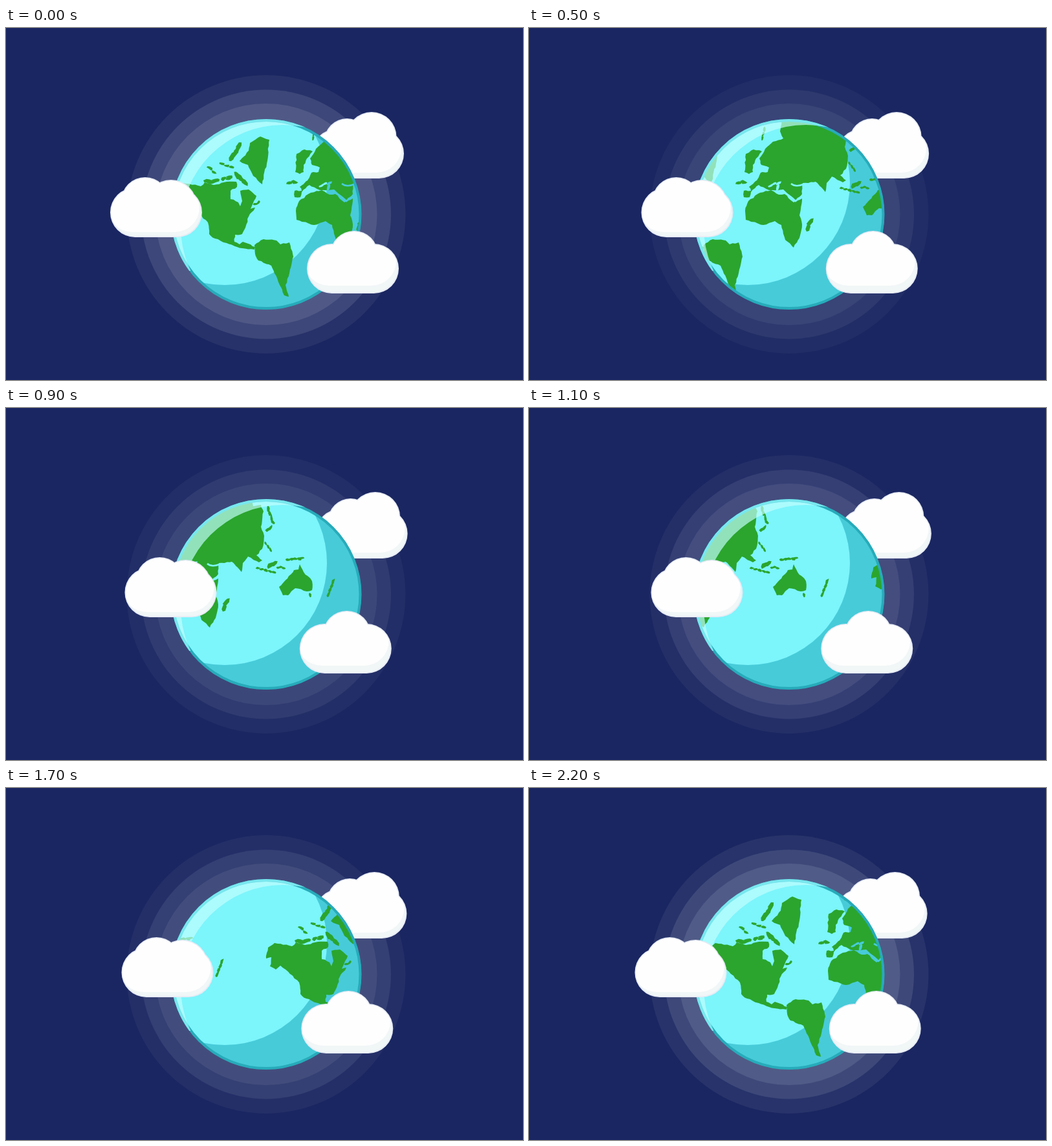
An HTML page with a canvas for the animation above (2.3 s loop, 799x545 px).

```html
<!DOCTYPE html>
<html lang="en">
<head>
<meta charset="utf-8">
<title>Spinning globe</title>
<style>
html, body { margin: 0; width: 100%; height: 100%; overflow: hidden; background: #1a2661; }
canvas { display: block; }
</style>
</head>
<body>
<canvas id="stage" width="799" height="545"></canvas>
<script>
const ctx = document.getElementById('stage').getContext('2d');
const LOOP = 2300, STEP = 100;
const CX = 402, CY = 288.5, R = 147.5;
const MAP_X = 250, MAP_W = 521;
const TAU = Math.PI * 2;

let seed = 7;
const rand = () => (seed = seed * 16807 % 2147483647) / 2147483647;
const spread = size => (rand() - .5) * size;

// Closed outline whose edges are broken by small random inlets
function coast(g, p, rough) {
  g.beginPath();
  for (let i = 0; i < p.length; i += 2) {
    const x = p[i], y = p[i + 1];
    const dx = p[(i + 2) % p.length] - x, dy = p[(i + 3) % p.length] - y;
    const parts = Math.ceil(Math.hypot(dx, dy) / 5);
    g.lineTo(x, y);
    for (let k = 1; k < parts; k++) {
      g.lineTo(x + dx * k / parts + spread(rough), y + dy * k / parts + spread(rough));
    }
  }
  g.closePath();
}

function buildMap() {
  const map = document.createElement('canvas');
  map.width = 600;
  map.height = 545;
  const g = map.getContext('2d');
  g.fillStyle = '#2ba52d';

  function at(dx, paint) {
    g.save();
    g.translate(dx - MAP_X, 0);
    paint();
    g.restore();
  }
  const land = (dx, ...p) => at(dx, () => { coast(g, p, 1.8); g.fill(); });

  // A chain of n small islands from one point to another
  const isles = (dx, x1, y1, x2, y2, n, size, scatter = 0) => at(dx, () => {
    const tilt = Math.atan2(y2 - y1, x2 - x1);
    for (let i = 0; i < n; i++) {
      const k = (i + .5) / n;
      g.save();
      g.translate(x1 + (x2 - x1) * k + spread(scatter), y1 + (y2 - y1) * k + spread(scatter));
      g.rotate(tilt + spread(.6));
      g.beginPath();
      for (let a = 0; a < 7; a++) {
        const r = size * (.7 + rand() * .6);
        g.lineTo(Math.cos(a * TAU / 7) * r * 1.5, Math.sin(a * TAU / 7) * r * .75);
      }
      g.fill();
      g.restore();
    }
  });

  // North America, Greenland, South America
  land(-99, 360,264, 363,247, 373,240, 400,245, 406,239, 420,243, 440,238, 455,238, 456,246,
    446,252, 446,265, 458,270, 461,276, 464,268, 461,252, 474,250, 486,260, 482,268, 477,280,
    484,278, 474,292, 469,309, 464,319, 453,320, 452,331, 460,335, 465,331, 484,339, 483,343,
    456,339, 440,333, 422,326, 413,319, 411,301, 390,281, 382,275, 375,281, 366,276, 368,262);
  land(0, 361,206, 375,190, 377,178, 393,168, 407,173, 403,210, 396,242, 382,229, 374,212);
  land(0, 384,336, 398,327, 418,329, 424,335, 438,332, 444,354, 439,374, 432,398, 437,416,
    430,414, 415,380, 410,368, 390,360, 385,350);
  // Africa, Eurasia, Scandinavia, Australia
  land(69, 384,268, 402,255, 419,251, 431,258, 440,257, 454,270, 467,264, 463,290, 467,304,
    463,325, 454,340, 441,328, 435,305, 425,299, 407,305, 380,297, 379,283);
  land(69, 377,252, 388,252, 385,246, 397,236, 403,224, 414,223, 416,216, 404,212, 401,202,
    410,187, 422,176, 438,171, 433,160, 436,138, 518,138, 521,152, 533,150, 537,160, 533,184,
    538,198, 535,218, 526,228, 535,236, 530,239, 513,230, 505,240, 503,254, 488,238, 468,240,
    467,257, 457,267, 438,250, 416,251, 400,243, 388,254, 386,262, 377,262);
  land(69, 378,223, 380,195, 392,188, 405,191, 396,202, 391,212, 391,223, 385,226);
  land(253, 377,277, 390,264, 400,251, 407,250, 409,242, 415,254, 428,268, 428,282, 420,284,
    402,279, 391,290, 383,290);

  // Arctic
  isles(0, 310,238, 326,236, 3, 4, 3);
  isles(0, 312,214, 324,226, 2, 3);
  isles(0, 332,210, 350,216, 3, 3, 4);
  isles(0, 336,236, 350,230, 3, 3.5, 5);
  isles(0, 345,203, 364,181, 4, 5, 4);
  isles(0, 354,224, 370,241, 3, 5, 2);
  isles(0, 383,274, 392,269, 2, 2.5);
  // Old World
  isles(69, 405,174, 409,154, 3, 2.5);
  isles(69, 366,240, 380,238, 2, 3.5);
  isles(69, 481,296, 475,312, 2, 4.5);
  isles(162, 450,153, 460,180, 4, 3);
  isles(162, 457,184, 448,190, 2, 3);
  isles(162, 445,207, 457,222, 3, 2.2);
  // Oceania
  isles(253, 341,247, 372,255, 5, 2.5);
  isles(253, 362,244, 371,240, 2, 4.5);
  isles(253, 374,246, 385,249, 3, 2.2, 3);
  isles(253, 388,234, 416,233, 5, 2.6, 2);
  isles(253, 424,287, 426,293, 1, 2.6);
  isles(253, 462,265, 452,292, 4, 2.8);

  // Inland seas
  g.globalCompositeOperation = 'destination-out';
  isles(69, 415,244, 433,240, 3, 2.8, 2);
  isles(69, 430,242, 429,251, 1, 3.4);
  at(69, () => {
    g.lineWidth = 2.6;
    g.beginPath();
    g.moveTo(432, 252);
    g.quadraticCurveTo(445, 256, 457, 268);
    g.lineTo(468, 259);
    g.moveTo(450, 241);
    g.quadraticCurveTo(457, 247, 469, 242);
    g.stroke();
  });
  return map;
}

// Two base circles joined by a flat floor, then the upper bumps
function cloud(x, y, bumps, travel, lift) {
  const r = 38.5, width = 65;
  const shape = inset => {
    const path = new Path2D();
    for (const [cx, cy, cr] of [[x, y, r], [x + width, y, r], ...bumps]) {
      path.moveTo(cx + cr - inset, cy);
      path.arc(cx, cy, cr - inset, 0, TAU);
    }
    path.rect(x, y - 25, width, 25 + r - inset);
    return path;
  };
  return { edge: shape(0), body: shape(1.6), travel, lift };
}

const backCloud = cloud(511.5, 194.5, [[527, 175, 35], [565, 168.5, 38.5]], 7.5, 9);
const leftCloud = cloud(199.5, 285.5, [[215, 268, 37], [255, 275, 40]], 30, 8);
const frontCloud = cloud(503.5, 372.5, [[538, 351, 37]], -15, 12);

function drawCloud(c, drift) {
  ctx.save();
  ctx.translate(c.travel * drift, 0);
  ctx.fillStyle = '#e6ebf5';
  ctx.fill(c.edge);
  ctx.clip(c.body);
  ctx.fillStyle = '#f1f6f7';
  ctx.fill(c.body);
  ctx.translate(-4, -c.lift);
  ctx.fillStyle = '#fefefe';
  ctx.fill(c.edge);
  ctx.restore();
}

function disc(x, y, r, fill) {
  ctx.beginPath();
  ctx.arc(x, y, r, 0, TAU);
  ctx.fillStyle = fill;
  ctx.fill();
}

function rim(colour) {
  ctx.beginPath();
  ctx.arc(CX, CY, R - 2, 0, TAU);
  ctx.lineWidth = 4;
  ctx.strokeStyle = colour;
  ctx.stroke();
}

const map = buildMap();

function drawGlobe(scroll) {
  ctx.save();
  ctx.beginPath();
  ctx.arc(CX, CY, R - .5, 0, TAU);
  ctx.clip();
  disc(CX, CY, R, '#47cbd9');
  disc(338, 240, 158, '#7cf5fb');
  for (let k = 0; k < 2; k++) ctx.drawImage(map, MAP_X + k * MAP_W - scroll, 0);
  ctx.restore();
  rim('#27abba');

  // Bright crescent: the part of the globe left of an offset circle
  ctx.save();
  ctx.beginPath();
  ctx.rect(CX - R, CY - R, R + 62, 2 * R - 60);
  ctx.clip();
  ctx.beginPath();
  ctx.rect(0, 0, 799, 545);
  ctx.arc(428, 308, 158, 0, TAU);
  ctx.clip('evenodd');
  disc(CX, CY, R - 2, 'rgba(195,255,255,.67)');
  rim('#78e7ee');
  ctx.restore();
}

function draw(frame) {
  const n = frame < 20 ? frame : frame + 1; // the turn skips one beat near its end
  const drift = 1 - Math.abs(1 - n / 12);
  const scroll = 22.05 * n + 10.5 * Math.sin(Math.PI * n / 23) ** 2;
  const a = n * TAU / 24;
  const glow = .75 + .1 * Math.cos(a) - .12 * Math.sin(a) + .13 * Math.cos(2 * a);

  ctx.fillStyle = '#1a2661';
  ctx.fillRect(0, 0, 799, 545);
  for (const [r, peak] of [[215.5, .058], [193, .105], [171.5, .1]]) {
    disc(CX, CY, r, `rgba(255,255,255,${peak * glow})`);
  }
  drawCloud(backCloud, drift);
  drawGlobe(Math.round(scroll));
  drawCloud(leftCloud, drift);
  drawCloud(frontCloud, drift);
}

const start = performance.now();
function tick() {
  draw(Math.floor((performance.now() - start) % LOOP / STEP));
  requestAnimationFrame(tick);
}
tick();
</script>
</body>
</html>
```
